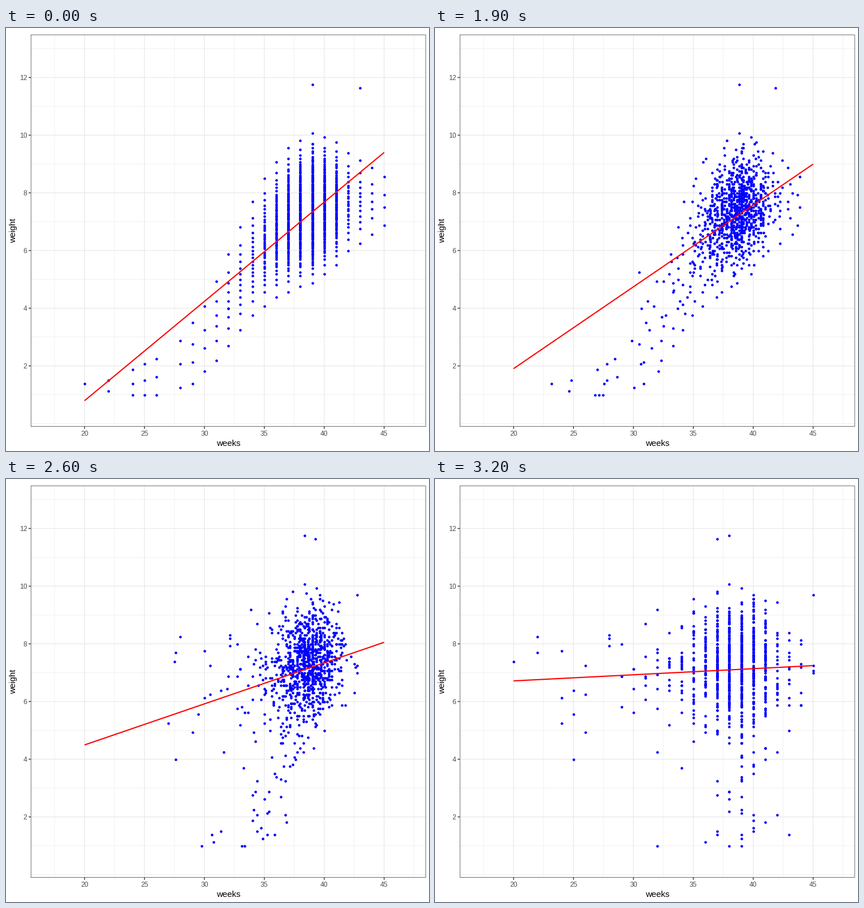
A matplotlib script that plays this animation: 748x748 px, repeating every 5 s.

```python
import numpy as np
import matplotlib.pyplot as plt
from matplotlib.animation import FuncAnimation
from matplotlib.patches import Rectangle

SIZE, DPI = 748, 100
PX = 72 / DPI  # points per pixel
LEFT, RIGHT, TOP, BOTTOM = 43.8, 742.5, 11.7, 705
STEP_MS, FRAMES = 100, 50
HOLD, MOVE = 16, 16  # steps before and during the shuffle

BASE = 15  # title size in pixels; the other theme sizes follow from it
LINE = BASE / 22 * 2.134
GRID, DARK, TICK_TEXT = "#ebebeb", "#333333", "#4d4d4d"

plt.rcParams["font.family"] = "Liberation Sans"

# Landmarks: first week, final week, weight
LANDMARKS = [(39, 38, 11.75), (43, 37, 11.63), (20, 37, 1.38),
             (40, 20, 7.38), (32, 25, 4.0), (39, 45, 9.69)]
EMPTY_WEEKS = (20, 21, 23, 27)


def sx(week):
    return 138.9 + 21.19 * (week - 20)


def sy(weight):
    return 699.5 - 51 * weight


def births(week):
    """Number of points in a column, peaking at week 39."""
    keys, counts = [20, 30, 34, 37, 39, 41, 42, 45], [2, 4, 20, 112, 245, 85, 24, 4]
    return round(np.exp(np.interp(week, keys, np.log(counts))))


def column(week):
    """Evenly ranked, nearly normal weights on a grid of sixteenths."""
    mean = 1.25 + 6.5 / (1 + np.exp((32.3 - week) / 2.2))
    spread = np.interp(week, [20, 30, 35, 45], [0.15, 1, 1, 0.75])
    count = births(week)
    rank = (np.arange(count) + 0.5) / count
    z = (rank**0.135 - (1 - rank) ** 0.135) / 0.1975
    return np.maximum(np.round((mean + spread * z) * 16) / 16, 1)


def build_points():
    crowd = [(week, w) for week in range(20, 46) if week not in EMPTY_WEEKS
             for w in column(week)]
    # The final weeks are a permutation of the first ones.
    pool = [week for week, _, _ in LANDMARKS] + [week for week, _ in crowd]
    for _, end, _ in LANDMARKS:
        pool.remove(end)
    ends = np.random.default_rng(7).permutation(pool)
    points = LANDMARKS + [(a, b, w) for (a, w), b in zip(crowd, ends)]
    return np.array(points, float).T


def segment(xs, ys, color, width, z):
    return ax.plot(xs, ys, color=color, lw=width * PX, zorder=z, snap=False,
                   solid_capstyle="butt")[0]


def label(x, y, text, size, color, **kw):
    ax.text(x, y, text, fontsize=size * PX, color=color, va="baseline", **kw)


def draw_panel():
    for week in np.arange(17.5, 48, 5):
        segment([sx(week)] * 2, [TOP, BOTTOM], GRID, LINE / 2, 1)
    for weight in [0, *range(1, 14, 2)]:
        segment([LEFT, RIGHT], [sy(weight)] * 2, GRID, LINE / 2, 1)

    tick, small = BASE / 4, 0.8 * BASE
    for week in range(20, 46, 5):
        x = sx(week)
        segment([x, x], [TOP, BOTTOM], GRID, LINE, 1)
        segment([x, x], [BOTTOM, BOTTOM + tick], DARK, LINE, 5)
        label(x, 721, str(week), small, TICK_TEXT, ha="center")
    for weight in range(2, 13, 2):
        y = sy(weight)
        segment([LEFT, RIGHT], [y, y], GRID, LINE, 1)
        segment([LEFT - tick, LEFT], [y, y], DARK, LINE, 5)
        label(37.2, y + 4.3, str(weight), small, TICK_TEXT, ha="right")

    # Only the inner half of the border shows.
    inset = LINE / 4
    ax.add_patch(Rectangle((LEFT + inset, TOP + inset),
                           RIGHT - LEFT - 2 * inset, BOTTOM - TOP - 2 * inset,
                           fill=False, ec=DARK, lw=LINE / 2 * PX, zorder=5,
                           snap=False))
    label((LEFT + RIGHT) / 2, 739.2, "weeks", BASE, "black", ha="center")
    label(16.7, (TOP + BOTTOM) / 2, "weight", BASE, "black", ha="center",
          rotation=90, rotation_mode="anchor")


fig = plt.figure(figsize=(SIZE / DPI, SIZE / DPI), dpi=DPI, facecolor="white")
ax = fig.add_axes([0, 0, 1, 1])
ax.set(xlim=(0, SIZE), ylim=(SIZE, 0))
ax.axis("off")
draw_panel()

first, final, weights = build_points()
dots, = ax.plot(sx(first), sy(weights), "o", color="#0000ff", ms=4.6 * PX,
                mew=0, zorder=3, snap=False)
fit_first, fit_final = np.array([0.794, 9.40]), np.array([6.716, 7.245])
fit = segment(sx(np.array([20, 45])), sy(fit_first), "#ff0000", 2.13, 4)


def update(i):
    t = min(max((i - HOLD) / MOVE, 0), 1)
    dots.set_xdata(sx(first + t * (final - first)))
    fit.set_ydata(sy(fit_first + t * (fit_final - fit_first)))
    return dots, fit


anim = FuncAnimation(fig, update, frames=FRAMES, interval=STEP_MS, repeat=True,
                     repeat_delay=0)
plt.show()
```
